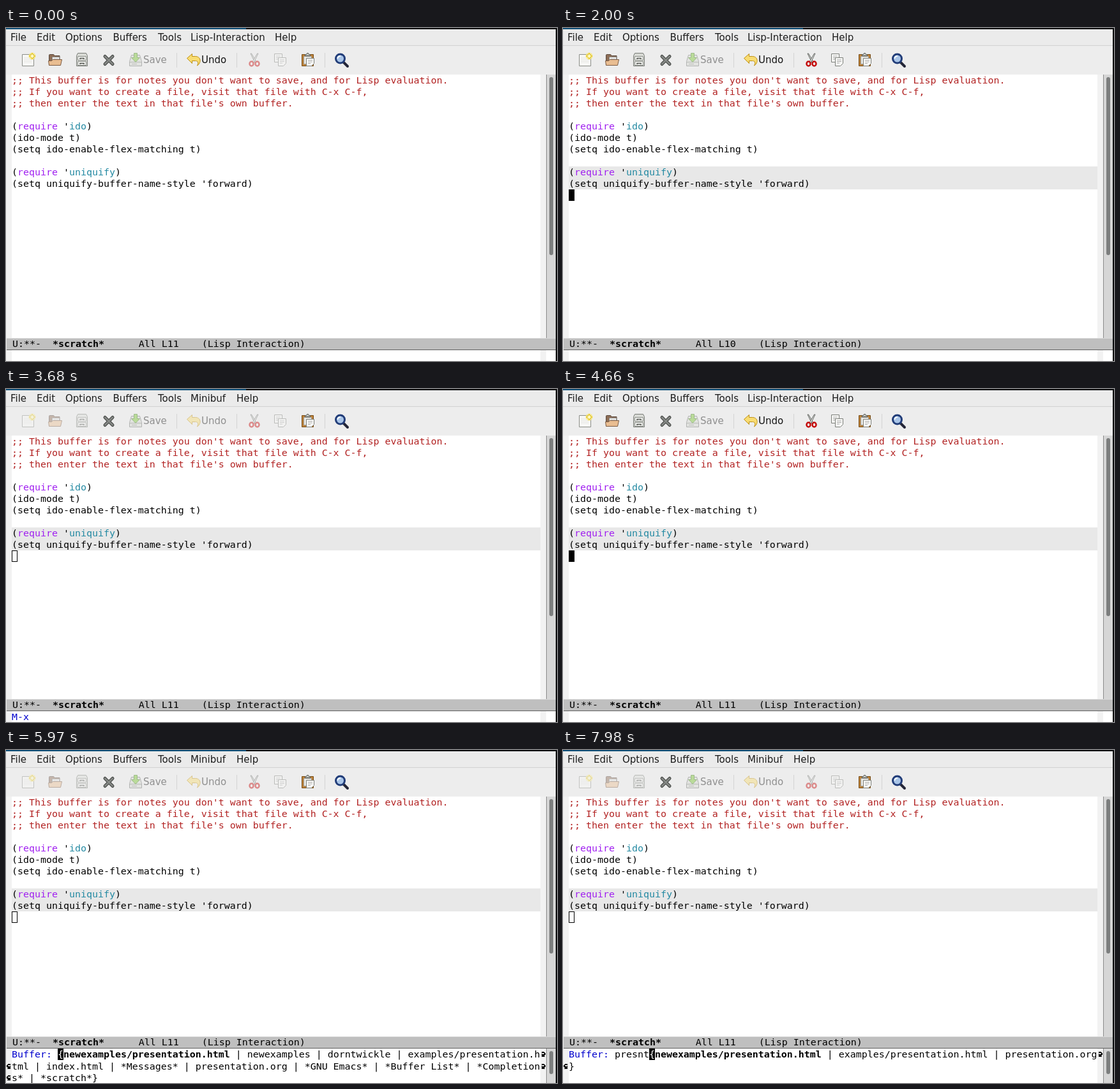
Write an HTML page that moves like this. It is 863 px wide and 522 px high and loops after 8 s.

```html
<!DOCTYPE html>
<html lang="en">
<head>
<meta charset="utf-8">
<title>Evaluating a region</title>
<style>
html, body { margin: 0; width: 100%; height: 100%; overflow: hidden; }
body { position: relative; background: #fff; color: #000; }
div, svg { position: absolute; }
#stage { left: 0; top: 0; width: 863px; height: 522px; overflow: hidden; }
.mono, .cursor, .row { font: 14.95px/18px "DejaVu Sans Mono", monospace; white-space: pre; }
#menu, #tools { left: 0; width: 861px; background: #ebebeb; }
#menu { top: 2px; height: 25px; border-bottom: 1px solid #d2d2d2; }
#tools { top: 28px; height: 45px; background: #ededed; }
#menu div { top: 4px; font: 15px/18px "DejaVu Sans", sans-serif; color: #1c1c1c; white-space: pre; }
#top { left: 0; top: 0; width: 863px; height: 2px; background: linear-gradient(90deg, #0b4f78 376px, #0d0f11 376px); }
#edge { left: 861px; top: 0; width: 2px; height: 522px; background: #0d0f11; }
.fringe { width: 9px; background: #f2f2f2; top: 73px; height: 449px; }
#region { left: 9px; top: 217px; width: 828px; background: #e8e8e8; }
#text { left: 9px; top: 73px; }
.c { color: #b22222; }
.k { color: #a020f0; }
.q { color: #2389a2; }
.p { color: #0000cd; }
.bar { left: 846px; width: 14px; border-left: 1px solid #8a8a8a; background: #d6d6d6; }
.bar div { left: 4px; top: 4px; bottom: 0; width: 6px; border-radius: 3px; background: #7c7e7e; }
#mode { left: 1px; width: 860px; height: 17px; background: #bfbfbf; border-top: 1px solid #d8d8d8; border-bottom: 1px solid #5f5f5f; }
#mode div { left: 9px; top: -1px; }
.cursor { width: 9px; height: 18px; box-sizing: border-box; background: #000; color: #fff; overflow: hidden; }
.hollow { background: none; border: 1px solid #000; color: transparent; }
.row { left: 9px; height: 18px; }
.off { opacity: .43; }
</style>
</head>
<body>
<div id="stage">
  <div class="fringe" style="left:0"></div>
  <div class="fringe" style="left:837px"></div>
  <div id="region"></div>
  <div id="text" class="mono"><span class="c">;; This buffer is for notes you don't want to save, and for Lisp evaluation.
;; If you want to create a file, visit that file with C-x C-f,
;; then enter the text in that file's own buffer.</span>

(<span class="k">require</span> '<span class="q">ido</span>)
(ido-mode t)
(setq ido-enable-flex-matching t)

(<span class="k">require</span> '<span class="q">uniquify</span>)
(setq uniquify-buffer-name-style 'forward)</div>
  <div id="point" class="cursor"></div>
  <div id="bar" class="bar" style="top:73px"><div></div></div>
  <div id="mode"><div class="mono"></div></div>
  <div id="mini"></div>
  <div id="minibar" class="bar" style="top:468px;height:54px"><div style="bottom:14px"></div></div>

  <div id="menu"></div>
  <div id="tools"></div>
  <svg width="861" height="73" style="left:0;top:0" fill="none" font-family="DejaVu Sans, sans-serif" font-size="15">
    <path d="M267.5 39v23M361.5 39v23M499.5 39v23" stroke="#d3d3d3"/>
    <g class="cmd" transform="translate(23 38)">
      <path d="M2.500 3.500h18v18h-18z" fill="#f7f7f5" stroke="#8b8d88"/>
      <path d="M5 9h9M5 12h12M5 15h12" stroke="#e4e4e1"/>
      <circle cx="18" cy="6" r="5.500" fill="#f8e66a" opacity=".7"/>
      <path d="M18 1l1.500 3.500L23 6l-3.500 1.500L18 11l-1.500-3.500L13 6l3.500-1.500z" fill="#fffbd0" stroke="#e3c21c"/>
    </g>
    <g class="cmd" transform="translate(65 38)">
      <path d="M2.500 20V4.500q0-1 1-1h6l2 2h7.500V19z" fill="#8d6d55" stroke="#59493e"/>
      <path d="M7.500 7.500h11v9h-11z" fill="#f4f4f2" stroke="#8d8d8a"/>
      <path d="M9 10h8M9 12h8" stroke="#bbb"/>
      <path d="M1.500 13.500h5l2-2h14l-2 9H2.500z" fill="#e9bd91" stroke="#7b5b43"/>
    </g>
    <g class="cmd" transform="translate(107 38)">
      <path d="M5.500 1.500h13l2 4v16h-17v-16z" fill="#d9dbd6" stroke="#777a75"/>
      <path d="M5.500 6.500h13v6h-13zM5.500 14.500h13v6h-13z" fill="#f0f1ee" stroke="#8a8d88"/>
      <path d="M9 11V9.500h6V11M9 19v-1.500h6V19" stroke="#51544f" stroke-width="1.500"/>
    </g>
    <g transform="translate(149 38)" stroke-linecap="round">
      <path d="M6 6.500L18 18.500M18 6.500L6 18.500" stroke="#444744" stroke-width="5"/>
      <path d="M6 6.500L18 18.500M18 6.500L6 18.500" stroke="#858885" stroke-width="2.800"/>
    </g>
    <g class="off" transform="translate(191 38)">
      <path d="M5.500 4.500h13l3 10v7h-19v-7z" fill="#d4d6d1" stroke="#666965"/>
      <path d="M3 15.500h18M6 18.500h8" stroke="#777a75"/>
      <path d="M9.500 1.500h5v7h4l-6.500 7-6.500-7h4z" fill="#78c52d" stroke="#397b0c"/>
      <text x="24" y="17" fill="#161616">Save</text>
    </g>
    <g class="cmd" transform="translate(282 38)">
      <path d="M1.500 9.500l8-7v4h5c9 0 10 10 3 14.500 3-6 0-7.500-3-7.500h-5v4z" fill="#f8dc72" stroke="#bd8f12" stroke-linejoin="round"/>
      <text x="24" y="17" fill="#161616">Undo</text>
    </g>
    <g class="sel" transform="translate(377 38)">
      <path d="M6 2l1.500 0L15 15l-2 1.500z" fill="#e4e6e2" stroke="#60635f"/>
      <path d="M18 2l-1.500 0L9 15l2 1.500z" fill="#f4f5f3" stroke="#60635f"/>
      <ellipse cx="7.500" cy="18" rx="3" ry="3.500" stroke="#c40d0d" stroke-width="2.500"/>
      <ellipse cx="16.500" cy="18" rx="3" ry="3.500" stroke="#c40d0d" stroke-width="2.500"/>
    </g>
    <g class="sel" transform="translate(418 38)" fill="#f7f7f5" stroke="#7b7e79">
      <path d="M2.500 2.500h12v13h-12z"/>
      <path d="M5 6h7M5 8.500h7M5 11h7" stroke="#aaa"/>
      <path d="M8.500 8.500h12v9l-4 4h-8z"/>
      <path d="M11 12h7M11 14.500h7M11 17h4" stroke="#aaa"/>
    </g>
    <g transform="translate(461 38)">
      <path d="M2.500 3.500h18v18h-18z" fill="#bd8138" stroke="#77501d"/>
      <path d="M5.500 6.500h12v12h-12z" fill="#e8e8e4" stroke="#9b9b96"/>
      <path d="M7.500 5.500v-2h2l1-2h2l1 2h2v2z" fill="#c7c9c4" stroke="#565954"/>
      <path d="M9.500 9.500h12v8l-4 4h-8z" fill="#fbfbf9" stroke="#7b7e79"/>
      <path d="M12 12.500h7M12 15h7M12 17.500h4" stroke="#aaa"/>
    </g>
    <g transform="translate(513 38)">
      <path d="M16 16l6 6" stroke="#242638" stroke-width="4" stroke-linecap="round"/>
      <circle cx="10.500" cy="10" r="7" fill="#a9c5e8" stroke="#213c78" stroke-width="3"/>
      <path d="M6.500 10q0-4 4.500-4" stroke="#f3f8ff" stroke-width="2"/>
    </g>
  </svg>
  <div id="top"></div>
  <div id="edge"></div>
</div>
<script>
const $ = id => document.getElementById(id);
const LOOP = 8000, CELL = 9, COLS = 92;

const deck = 'newexamples/presentation.html';
const copy = 'examples/presentation.html';
const org = 'presentation.org';
const all = [deck, 'newexamples', 'dorntwickle', copy, 'index.html', '*Messages*', org,
  '*GNU Emacs*', '*Buffer List*', '*Completions*', '*scratch*'];
const decks = [deck, copy, org];
const withP = [deck, 'newexamples', copy, org, '*Completions*'];

// Each step changes only the listed parts of the state.
const steps = [
  [0, { line: 11, num: 11, on: 0, region: 0, sel: 0, echo: '', prompt: '', typed: '', hint: '', names: null }],
  [140, { on: 1 }],
  [500, { line: 10, num: 10 }],
  [640, { line: 9 }], [680, { num: 9 }],
  [820, { line: 8 }], [860, { num: 8 }],
  [1240, { line: 9 }], [1280, { num: 9 }],
  [1560, { echo: 'Mark set' }], [1600, { sel: 1 }],
  [1780, { line: 10, region: 1, echo: '' }], [1820, { num: 10 }],
  [2000, { line: 11, region: 2 }], [2040, { num: 11 }],
  [2240, { echo: 'End of buffer' }],
  [2740, { on: 0 }],
  [3170, { on: 1, echo: '', prompt: 'M-x ' }],
  [3680, { on: 0 }],
  [3940, { on: 1, hint: 'eval-region' }],
  [4400, { on: 0 }],
  [4620, { on: 1, prompt: '', hint: '' }],
  [5130, { on: 0 }],
  [5630, { on: 1 }],
  [5970, { prompt: 'Buffer: ', names: all }],
  [6430, { on: 0 }],
  [6630, { on: 1, typed: 'p', names: withP }],
  [6800, { typed: 'pr', hint: '[esentation.]', names: decks }],
  [6840, { typed: 'pre', hint: '[sentation.]' }],
  [7110, { typed: 'pres', hint: '[entation.]' }],
  [7510, { typed: 'presn', hint: '' }],
  [7980, { typed: 'presnt' }]
];

const at = (x, y, cls, body) => `<div class="${cls}" style="left:${x}px;top:${y}px">${body}</div>`;

function menuBar(active) {
  const items = [[7, 'File'], [48, 'Edit'], [93, 'Options'], [167.5, 'Buffers'], [238, 'Tools'],
    [289, active ? 'Minibuf' : 'Lisp-Interaction'], [active ? 361 : 421, 'Help']];
  return items.map(([x, s]) => `<div style="left:${x}px">${s}</div>`).join('');
}

function arrow(x, y, flip) {
  return `<svg width="8" height="8" style="left:${x}px;top:${y}px${flip ? ';transform:scaleX(-1)' : ''}" shape-rendering="crispEdges">
    <path d="M2 0h4v1h1v1h1v3h-1v1h-1v1h1v1H2V3h1v1h2v-1h1V2H2z"/></svg>`;
}

function miniBuffer(s) {
  const tops = s.names ? [468, 487, 505] : [505];
  if (!s.prompt) return at(9, 505, 'row', s.echo);
  const point = s.prompt.length + s.typed.length;
  const list = s.names ? `{${s.names.join(' | ')}}` : '';
  const str = s.prompt + s.typed + s.hint + list;
  const first = point + s.hint.length + 1;
  const cuts = [0, s.prompt.length, first, first + (s.names ? s.names[0].length : 0), str.length];
  const tags = ['span class="p"', 'span', 'b', 'span'];
  let html = '';
  for (let r = 0; r * COLS < str.length; r++) {
    const from = r * COLS, to = from + COLS;
    const body = tags.map((tag, i) => {
      const part = str.slice(Math.max(from, cuts[i]), Math.max(from, Math.min(to, cuts[i + 1])));
      return part && `<${tag}>${part}</${tag.split(' ')[0]}>`;
    }).join('');
    html += at(9, tops[r], 'row', body);
    if (r) html += arrow(1, tops[r] + 5, true);
    if (to < str.length) html += arrow(837, tops[r] + 5);
  }
  if (s.on) html += at(9 + point * CELL, tops[0], 'cursor', str[point] || ' ');
  return html;
}

function draw(s) {
  const active = !!s.prompt, modeTop = s.names ? 449 : 486;
  $('menu').innerHTML = menuBar(active);
  document.querySelectorAll('.cmd').forEach(g => g.classList.toggle('off', active));
  document.querySelectorAll('.sel').forEach(g => g.classList.toggle('off', active || !s.sel));
  $('region').style.height = s.region * 18 + 'px';

  const point = $('point');
  point.style.left = '9px';
  point.style.top = 73 + (s.line - 1) * 18 + 'px';
  point.style.visibility = s.on || active ? 'visible' : 'hidden';
  point.classList.toggle('hollow', active);
  point.textContent = s.line === 9 || s.line === 10 ? '(' : '';

  $('mode').style.top = modeTop + 'px';
  $('mode').firstChild.innerHTML = `U:**-  <b>*scratch*</b>      All ${('L' + s.num).padEnd(7)}(Lisp Interaction)`;
  $('bar').style.height = modeTop - 73 + 'px';
  $('bar').firstChild.style.bottom = '130px';
  $('minibar').style.display = s.names ? 'block' : 'none';
  $('mini').innerHTML = miniBuffer(s);
}

let shown = -1;
function tick() {
  const t = performance.now() % LOOP;
  const n = steps.filter(([start]) => start <= t).length;
  if (n !== shown) {
    shown = n;
    draw(Object.assign({}, ...steps.slice(0, n).map(step => step[1])));
  }
  requestAnimationFrame(tick);
}
tick();
</script>
</body>
</html>
```
